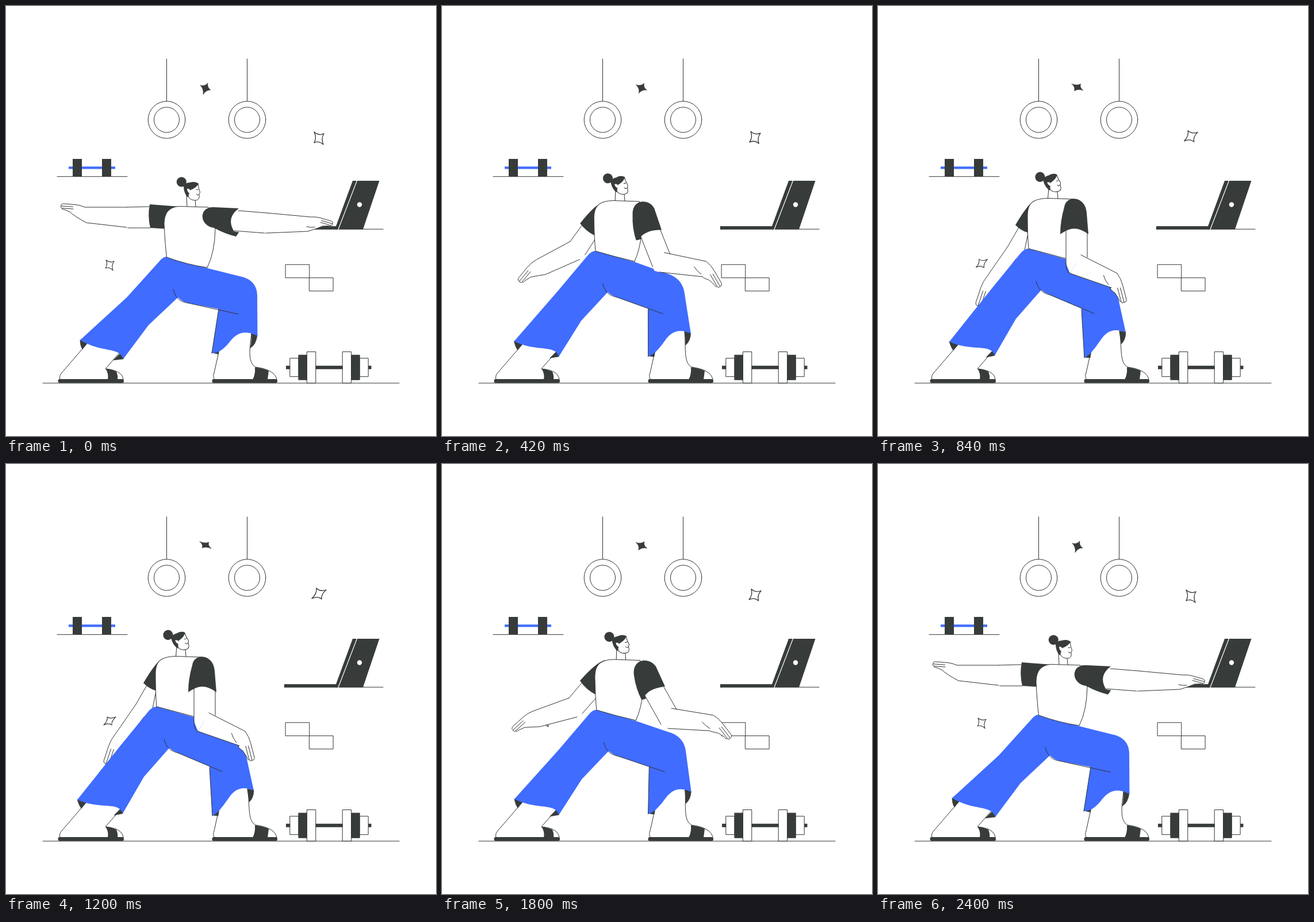
An HTML page with a canvas that plays this animation: 748 px wide and 748 px high, repeating every 2.94 s.

```html
<!DOCTYPE html>
<html lang="en">
<head>
<meta charset="utf-8">
<title>Stretch break</title>
<style>
html, body { margin: 0; width: 100%; height: 100%; overflow: hidden; background: #fff; }
canvas { display: block; width: 748px; height: 748px; }
</style>
</head>
<body>
<canvas id="stage" width="748" height="748"></canvas>
<script>
const ctx = document.getElementById('stage').getContext('2d');
const DARK = '#373c3b', BLUE = '#406cff', WHITE = '#fff', INK = '#303433';
const LOOP = 2940, MOVE = 2400, STEP = 60;
const KNOTS = [0, .31, .605, 1];

const clamp = x => Math.min(1, Math.max(0, x));
const smooth = x => { x = clamp(x); return x * x * (3 - 2 * x); };

// Two poses blend linearly; four poses follow a cubic through the knots.
function weights(u, count) {
  if (count === 2) return [1 - u, u];
  return KNOTS.map((k, i) => KNOTS.reduce((w, m, j) => i === j ? w : w * (u - m) / (k - m), 1));
}

function morph(u, ...poses) {
  const w = weights(u, poses.length);
  const nums = poses.map(p => p.match(/-?[\d.]+/g).map(Number));
  let i = 0;
  return poses[0].replace(/-?[\d.]+/g, () => {
    const v = nums.reduce((sum, n, k) => sum + n[i] * w[k], 0);
    i++;
    return v.toFixed(2);
  });
}

function draw(d, fill, stroke, width = 1) {
  const p = new Path2D(d);
  if (fill) { ctx.fillStyle = fill; ctx.fill(p); }
  if (stroke) { ctx.strokeStyle = stroke; ctx.lineWidth = width; ctx.stroke(p); }
}
const line = d => draw(d, null, INK);

function box(x, y, w, h, fill, stroke) {
  draw(`M${x} ${y}h${w}v${h}h${-w}Z`, fill, stroke);
}

function circle(x, y, r, fill, stroke) {
  ctx.beginPath();
  ctx.arc(x, y, r, 0, Math.PI * 2);
  if (fill) { ctx.fillStyle = fill; ctx.fill(); }
  if (stroke) { ctx.strokeStyle = stroke; ctx.lineWidth = 1; ctx.stroke(); }
}

function sparkle(s, from, to, fill, width) {
  const n = morph(s, from, to).split(' ').map(Number);
  const cx = (n[0] + n[2] + n[4] + n[6]) / 4, cy = (n[1] + n[3] + n[5] + n[7]) / 4;
  let d = `M${n[0]} ${n[1]}`;
  for (let i = 0; i < 8; i += 2) {
    const j = (i + 2) % 8;
    const qx = cx + ((n[i] + n[j]) / 2 - cx) * .4, qy = cy + ((n[i + 1] + n[j + 1]) / 2 - cy) * .4;
    d += `Q${qx} ${qy} ${n[j]} ${n[j + 1]}`;
  }
  draw(d + 'Z', fill, INK, width);
}

function room(s) {
  for (const x of [279.5, 419.5]) {
    line(`M${x} 92V165.5`);
    circle(x, 198, 32.3, null, INK);
    circle(x, 198, 22, null, INK);
  }
  sparkle(s, '338 138 351 134 356 146 343 154', '337 135 353 136 357 147 341 146', DARK, .6);
  sparkle(s, '536 219 553 222 552 241 536 238', '540 216 557 219 549 235 532 234', WHITE, 1.3);
  sparkle(s, '174 442 188 444 186 460 173 456', '176 440 191 440 184 454 170 454', WHITE, 1.1);

  line('M89 296.7H211');
  box(109, 279.3, 81, 4.2, BLUE);
  box(116, 266, 16, 31, DARK);
  box(167, 266, 16, 31, DARK);

  line('M484 388.2H656');
  box(484, 383, 93, 5.6, DARK);
  draw('M603 304H649.5L621 388.5H572Z', DARK);
  draw('M610.5 304L578 388.5', null, WHITE, 1.2);
  circle(615, 345.5, 4.2, WHITE);

  box(486.5, 449.8, 41.3, 23, null, INK);
  box(527.8, 472.8, 41.3, 23, null, INK);

  line('M64 656H684');
  box(487, 625.8, 148.5, 6, DARK);
  for (const side of [-1, 1]) {
    const plate = (near, w, h, fill) =>
      box(side < 0 ? 562.2 - near - w : 562.2 + near, 628.7 - h / 2, w, h, fill, INK);
    plate(53, 15, 32, WHITE);
    plate(38.5, 14.5, 43, DARK);
    plate(23.4, 15, 54.4, WHITE);
  }
}

function feet(u) {
  // Back foot
  draw('M141 587L97 638Q92 643 94 650H204Q206 640 192 633L173 631L202 598Z', WHITE);
  line('M141 587L97 638Q92 643 94 650M202 598L173 631Q203 634 204 650');
  draw('M173 631Q184 632 192 636Q195 643 194 650H177Q179 639 173 631Z', DARK);
  // Front foot
  const shin = morph(u, 'M427 570C425 590 419 620 434 628', 'M420 566C425 590 419 620 434 628');
  draw(shin + 'Q469 633 471 650H363Q359 645 362 638L371 598Z', WHITE);
  line(shin + 'Q469 633 471 650');
  line('M371 598L362 638Q359 645 363 650');
  draw('M433 628.5Q447 630 457 634.5Q456 643 455 650H429Q434 641 433 628.5Z', DARK);
  for (const [x, w] of [[90.5, 114.5], [358.5, 113.5]]) {
    ctx.fillStyle = DARK;
    ctx.beginPath();
    ctx.roundRect(x, 649, w, 6.8, 3);
    ctx.fill();
  }
}

function pants(u) {
  const cuffs = morph(u,
    'M129 581Q129 591 133 597L141 587ZM204 614L187 616L201 602ZM437 573Q435 589 425 595Q428 580 427 568ZM358 603L369 605.5L371 597Z',
    'M124 584Q127 594 131 599L140 588ZM203 608L188 611L200 599ZM431 567Q431 581 423 588Q422 576 420 565ZM359 611L369 612L371 600Z');
  draw(cuffs, DARK, INK, .6);
  draw(morph(u,
    'M280 436L350 456L410 471C428 475 437 488 437 503L437.5 574C418 564 404 566 390 583C379 598 368 604 358 604L370 527L318 517Q307 515 299 507L248 555L204 614C197 592 166 604 129 581L210 507L266 445Q273 436 280 436Z',
    'M262 422L329 441L386 464C405 470 414 485 416 500L431 568C412 560 398 564 386 583C376 597 368 608 359 612L354 526L300 503Q291 500 284 494L240 544L203 608C196 586 164 602 124 584L199 490L248 430Q255 422 262 422Z'), BLUE);
  line(morph(u,
    'M291 493C296 512 306 515 318 517L404 536M370 527L358 604',
    'M275 479C280 497 290 500 300 503L376 535M354 528L359 612'));
}

function torso(u) {
  const d = morph(u,
    'M350 455Q363 430 364 388L352 350L301 348.5C281 350 275 363 275 380Q277 418 279.5 437Q315 450 350 455',
    'M329 440Q337 420 340 400L340 336L296 334.5C266 335 260 346 260 366Q260 402 262 422Q296 431 329 440');
  draw(d, WHITE, INK);
}

function head(u) {
  draw(morph(u, 'M314 330L315 349H330L329 336Z', 'M297 316L295.5 335H313L312 320Z'), WHITE);
  line(morph(u, 'M314 330L315 349M329 337L330 349', 'M297 316L295.5 335M312 321L313 335'));
  ctx.save();
  ctx.translate(322 - 20.5 * u, 320 - 13 * u);
  ctx.rotate(-.24 * u);
  ctx.translate(-322, -320);
  draw('M334 309Q335 318 337.5 324Q337 326 336 327V333Q335 338 329 338Q322 338 318 333L314 320L320 310Z', WHITE, INK);
  draw('M309 313Q312 307 320 307Q329 304 335 309Q332 316 321 320L316 333Q309 325 309 313Z', DARK);
  draw('M319.5 326Q315 323 315 318Q319 317 321 322Z', WHITE);
  line('M331 319.5Q333 320.5 334.5 319M331 327Q332.5 330 335.5 328');
  circle(305.3, 306, 8.6, DARK);
  ctx.restore();
}

// Forearm and hand in one outline; the hand is laid out along wrist -> tip.
function forearm(points, side) {
  const [sx, sy, wx, wy, tx, ty, bx, by, ex, ey] = points.split(' ').map(Number);
  const dx = tx - wx, dy = ty - wy;
  const at = (x, y) => `${wx + dx * x - side * dy * y} ${wy + dy * x + side * dx * y} `;
  draw(`M${sx} ${sy}L${wx} ${wy}Q${at(.2, -.08)}${at(.42, -.08)}L${at(.92, -.08)}Q${at(1.03, -.06)}${at(1, .02)}` +
    `Q${at(1.04, .1)}${at(.95, .11)}Q${at(.97, .17)}${at(.86, .16)}L${at(.62, .24)}Q${at(.4, .42)}${bx} ${by}L${ex} ${ey}`, WHITE, INK);
  line(`M${at(.5, .02)}L${at(1, .02)}M${at(.48, .11)}L${at(.95, .11)}`);
  if (side > 0) line(`M${at(-.05, .46)}Q${at(.12, .46)}${at(.3, .38)}`);
}

function backArm(u) {
  const upper = morph(u,
    'M249 349L210 350L210 385L251 386', 'M245 373L215 392L228 425L266 403',
    'M243 381L221 407L244 434L267 408', 'M245 385L226 418L255 425L261 395');
  draw(upper, WHITE);
  forearm(morph(u,
    '210 350 137 350 96 347 140 377 210 385', '215 392 146 396 103 413 150 421 219 427',
    '221 407 158 430 123 462 170 457 235 440', '226 418 190 470 173 521 208 483 240 440'), -1);
  line(morph(u,
    'M249 349L210 350M251 386L212 386', 'M245 373L215 392M266 403L228 425',
    'M243 381L221 407M267 408L244 434', 'M245 385L226 418M261 395L255 425'));
  draw(morph(u,
    'M303 349Q275 347 250 345Q246 365 251 386L285 388Z', 'M291 343Q272 345 241 369Q250 390 268 402L276 398Z',
    'M284 341Q268 345 240 377Q250 392 267 401L268 396Z', 'M273 338Q262 342 239 381Q249 391 260 394L262 390Z'), DARK);
}

function frontArm(u) {
  draw(morph(u,
    'M404 356L454 360L454 360L452 395L450 395L397 391L385 372Z', 'M399 376L435 405L430 404L428 441L420 439L376 408L370 385Z',
    'M386 388L408 427L399 425L393 460L384 459L353 403L360 388Z', 'M364 390L364 437L353 433L334 465L327 448L327 390L344 380Z'), WHITE);
  forearm(morph(u,
    '454 360 530 367 568 378 525 392 452 395', '430 404 500 412 541 438 490 439 428 441',
    '399 425 472 437 502 476 465 464 393 460', '353 433 416 465 429 515 406 490 334 465'), 1);
  line(morph(u,
    'M404 356L454 360M397 391L450 395', 'M399 376L435 405M376 408L418 438',
    'M386 388L408 427M353 403L381 453', 'M364 390L364 437M327 390L327 448'));
  if (u > .85) line(morph(u, 'M450 395Q451 395 452 395', 'M420 439Q424 441 428 441',
    'M384 459Q388 460 393 460', 'M327 448Q327 463 334 465'));
  draw(morph(u,
    'M405 352L362 350C335 348 335 382 362 386Q380 396 400 401Q404 396 405 393Q397 393 396 391Q383 368 405 352Z',
    'M401 376L375 354C352 335 328 354 343 380Q357 396 374 411Q377 410 379 408Q374 406 372 403Q369 386 401 376Z',
    'M388 387L372 352C360 335 330 338 334 368Q337 390 347 410Q351 410 355 408Q354 406 353 403Q362 390 388 387Z',
    'M366 397L363 360C361 330 327 328 324 350Q317 374 317 397Q321 394 327 391Q327 391 327 391Q345 381 366 397Z'), DARK);
}

function render(now) {
  const t = Math.min(MOVE, Math.floor((now % LOOP) / STEP) * STEP);
  const twinkle = (1 - Math.cos(t / MOVE * Math.PI * 2)) / 2;
  const u = smooth(t / 650) - smooth((t - 1495) / 710);
  ctx.fillStyle = WHITE;
  ctx.fillRect(0, 0, 748, 748);
  ctx.lineCap = ctx.lineJoin = 'round';
  room(twinkle);
  backArm(u);
  feet(u);
  pants(u);
  head(u);
  torso(u);
  frontArm(u);
}

const start = performance.now();
function tick() {
  render(performance.now() - start);
  requestAnimationFrame(tick);
}
tick();
</script>
</body>
</html>
```
